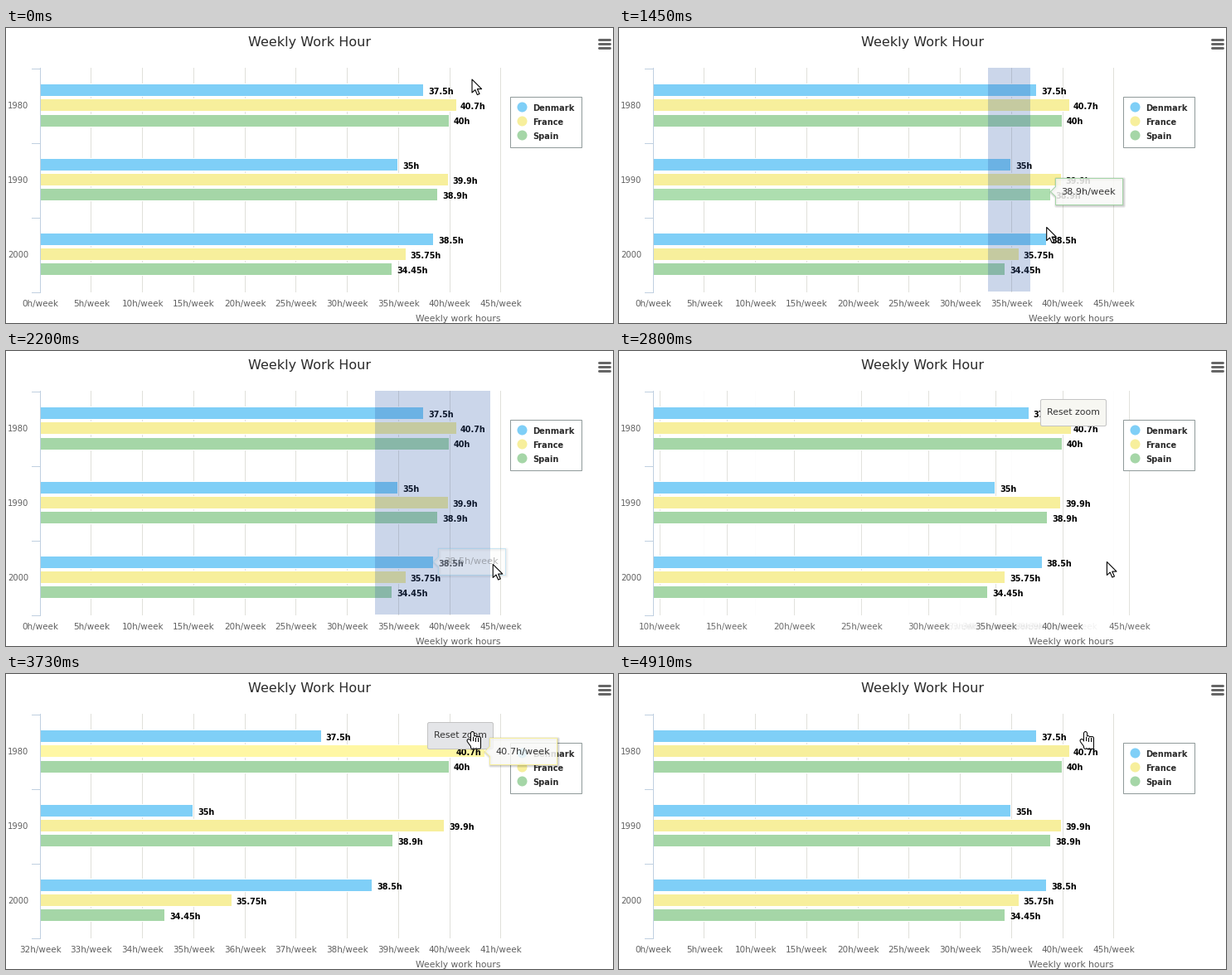
Write a matplotlib script that moves like this. It is 732 px wide and 356 px high and loops after 5.17 s.

```python
import math

import matplotlib.pyplot as plt
import numpy as np
from matplotlib.animation import FuncAnimation
from matplotlib.colors import to_rgb
from matplotlib.patches import Circle, Polygon, Rectangle, FancyBboxPatch

W, H, DPI = 732, 356, 100
PX = 72 / DPI
LOOP, STEP = 5170, 22
LEFT, TOP, BOTTOM = 41, 48, 318

YEARS = ["1980", "1990", "2000"]
SERIES = [
    ("Denmark", "#7fcff7", [37.5, 35, 38.5]),
    ("France", "#f7ef9c", [40.7, 39.9, 35.75]),
    ("Spain", "#a5d6a7", [40, 38.9, 34.45]),
]
WIDE_TICKS = range(0, 46, 5)
ZOOM_TICKS = range(32, 42)
SHARED = set(WIDE_TICKS) & set(ZOOM_TICKS)

DRAG, RELEASE, RESET = 960, 2740, 4370
ZOOM_IN, ZOOM_OUT, ZOOM_TIME = 2716, 4421, 495
HIDE_DELAY, FADE = 500, 250
SNAP = 60

# time, x, y
CURSOR = [(30, 562, 62), (360, 446, 53), (DRAG, 446, 53), (1450, 517, 244),
          (2100, 587, 258), (3100, 589, 253), (3600, 562, 69)]
ARROW = [(0, 0), (0, 16), (3.8, 12.6), (6.4, 18.6), (9, 17.5),
         (6.4, 11.6), (11.6, 11.6)]

plt.rcParams["font.family"] = "DejaVu Sans"
fig = plt.figure(figsize=(W / DPI, H / DPI), dpi=DPI, facecolor="white")
ax = fig.add_axes([0, 0, 1, 1])
ax.set_xlim(0, W)
ax.set_ylim(H, 0)
ax.axis("off")
moving = []


def text(x, y, s, size, color="#606060", ha="left", **kw):
    return ax.text(x, y, s, fontsize=size * PX, color=color, ha=ha,
                   va="baseline", **kw)


def line(xs, ys, color, width=1, **kw):
    return ax.plot(xs, ys, color=color, lw=width * PX, **kw)[0]


def rect(x, y, w, h, color, **kw):
    return ax.add_patch(Rectangle((x, y), w, h, fc=color, lw=0, **kw))


def shape(points, dx, dy, fill, edge, width=1, **kw):
    return ax.add_patch(Polygon(np.array(points) + (dx, dy), closed=True,
                                fc=fill, ec=edge, lw=width * PX,
                                joinstyle="round", **kw))


def swing(p):
    return 0.5 - math.cos(math.pi * min(max(p, 0), 1)) / 2


def lerp(a, b, k):
    return a + (b - a) * k


def wide_x(v):
    return LEFT + 12.35 * v


def zoom_x(v):
    return LEFT + 61.75 * (v - 32)


def value_x(v, k):
    return lerp(wide_x(v), zoom_x(v), k)


def zoom_at(t):
    return swing((t - ZOOM_IN) / ZOOM_TIME) - swing((t - ZOOM_OUT) / ZOOM_TIME)


def cursor_at(t):
    times, xs, ys = zip(*CURSOR)
    return np.interp(t, times, xs), np.interp(t, times, ys)


def bar_top(series, year):
    return round(68.1 + 89.85 * year + 18.25 * series)


def all_bars():
    for s, (_, color, values) in enumerate(SERIES):
        for year, v in enumerate(values):
            yield s, year, v, color


def anchor(series, year, k):
    return np.array([value_x(SERIES[series][2][year], k),
                     bar_top(series, year) + 7.5])


def find_hovers():
    """List (time, series, year) for each bar the cursor comes close to."""
    hovers = []
    for t in range(0, CURSOR[-1][0], 10):
        x, y = cursor_at(t)
        for s, year, v, _ in all_bars():
            inside = -2 <= y - bar_top(s, year) <= 16
            near = x < value_x(v, zoom_at(t)) + SNAP
            if inside and near and (not hovers or hovers[-1][1:] != (s, year)):
                hovers.append((t, s, year))
    return hovers


HOVERS = find_hovers()


def hover_at(t, k):
    """Return (series, year, position, alpha) of the tooltip, or None."""
    last = pos = None
    for start, s, year in HOVERS:
        if start > t:
            break
        target = anchor(s, year, k)
        if last is None or start - last[0] > HIDE_DELAY + FADE:
            pos = target
        else:
            pos = lerp(last[1], pos, math.exp((last[0] - start) / 50))
        last = start, target, s, year
    if last is None:
        return None
    start, target, s, year = last
    alpha = min(1, 1 - (t - start - HIDE_DELAY) / FADE)
    if alpha <= 0:
        return None
    return s, year, lerp(target, pos, math.exp((start - t) / 50)), alpha


def draw_static():
    text(366.5, 22, "Weekly Work Hour", 16, "#2b2b2b", "center")
    text(596, 354, "Weekly work hours", 10.7, "#606060", "right")
    for i in range(3):
        line([714.5, 727.5], [13.5 + 5 * i] * 2, "#666666", 3,
             solid_capstyle="round")
    line([LEFT - 0.5] * 2, [TOP, BOTTOM], "#c0d0e0", zorder=4)
    for i in range(4):
        line([LEFT - 10, LEFT], [TOP + 0.5 + 90 * i] * 2, "#c0d0e0")
    for i, year in enumerate(YEARS):
        text(27, 97 + 90 * i, year, 10, ha="right")
    ax.add_patch(Rectangle((607.5, 82.5), 86, 61, fc="white", ec="#909a9a",
                           lw=PX, zorder=5))
    for i, (name, color, _) in enumerate(SERIES):
        ax.add_patch(Circle((622.5, 95.5 + 17 * i), 6, fc=color, lw=0,
                            zorder=5))
        text(635.5, 100 + 17 * i, name, 9.9, "#2b2b2b", weight="bold", zorder=5)


def draw_ticks(t, k):
    zooming_in = t < RESET
    groups = [(WIDE_TICKS, 1 - k, wide_x, not zooming_in),
              (ZOOM_TICKS, k, zoom_x, zooming_in)]
    for ticks, opacity, final_x, incoming in groups:
        for v in ticks:
            if v in SHARED and ticks is ZOOM_TICKS:
                continue
            alpha = 1 if v in SHARED else opacity
            if alpha < 0.01:
                continue
            x = value_x(v, k)
            grid = final_x(v) if incoming and v not in SHARED else x
            yield line([grid - 0.5] * 2, [TOP, BOTTOM], "#e0e0da",
                       alpha=alpha, zorder=1)
            if -40 < x < W + 40:
                yield text(x + 0.2, 336, f"{v}h/week", 10.4, ha="center",
                           alpha=alpha)


def draw_bars(k, active):
    for s, year, v, color in all_bars():
        end, top = value_x(v, k), bar_top(s, year)
        fill = color
        if (s, year) == active:
            fill = [min(1, c + 0.03) for c in to_rgb(color)]
        yield rect(LEFT, top - 1, end - LEFT, 16, "white", zorder=2)
        yield rect(LEFT, top, end - LEFT - 1, 14, fill, zorder=2)
        # Labels stay inside the plot's right edge
        yield text(min(end + 5, lerp(548, 543, k)), bar_top(0, year) + 12 + 18 * s,
                   f"{v:g}h", 9.6, "black", weight="bold", zorder=6)


def draw_tooltip(series, year, pos, alpha):
    _, color, values = SERIES[series]
    outline = [(6, -16), (87, -16), (87, 16), (6, 16), (6, 6), (0, 0), (6, -6)]
    x, y = np.round(pos) - 0.5
    for width in (5, 3, 1):
        yield shape(outline, x + 1, y + 1, "none", "black", width,
                    alpha=0.07 * alpha, zorder=8)
    yield shape(outline, x, y, "#f9f9f7", "none", 0, alpha=0.85 * alpha,
                zorder=9)
    yield shape(outline, x, y, "none", color, alpha=alpha, zorder=9)
    yield text(x + 13, y + 3, f"{values[year]:g}h/week", 11.2, "#333333",
               alpha=alpha, zorder=9)


def draw_button(active):
    yield ax.add_patch(FancyBboxPatch(
        (508.5, 58.5), 79, 32, boxstyle="round,pad=0,rounding_size=2",
        fc="#e4e5e8" if active else "#f7f7f2", ec="#c4c4c4", lw=PX,
        zorder=7.5))
    yield text(515.5, 77, "Reset zoom", 10.9, "#333333", zorder=7.5)


def draw_hand(x, y):
    """Four fingers running down into the palm, plus a thumb."""
    fingers = [(x + 2.8 * i, y + 1.5 + (4.5 + 0.8 * i) * (i > 0))
               for i in range(4)]
    strokes = [([fx, fx], [top, y + 19]) for fx, top in fingers]
    strokes.append(([x - 4, x], [y + 11.5, y + 17]))
    for color, width in (("black", 5), ("white", 3)):
        for xs, ys in strokes:
            yield line(xs, ys, color, width, solid_capstyle="round", zorder=12)
    for fx, top in fingers[1:]:
        yield line([fx - 1.4] * 2, [top, top + 4], "black", zorder=12)


def scene(t):
    k = zoom_at(t)
    hover = hover_at(t, k)
    x, y = cursor_at(t)
    pointing = t > RELEASE and y < 90

    yield from draw_ticks(t, k)
    yield from draw_bars(k, hover[:2] if hover and hover[3] == 1 else None)
    if DRAG <= t < RELEASE:
        width = cursor_at(t - 130)[0] - 446
        yield rect(445, TOP, width, BOTTOM - TOP, "#335cad", alpha=0.25,
                   zorder=7)
    if RELEASE <= t < RESET:
        yield from draw_button(pointing)
    if hover:
        yield from draw_tooltip(*hover)
    if pointing:
        yield from draw_hand(x, y)
    else:
        yield shape(ARROW, x, y, "white", "black", 1.1, zorder=12)


def update(frame):
    while moving:
        moving.pop().remove()
    moving.extend(scene((frame + 0.5) * STEP))
    return moving


draw_static()
animation = FuncAnimation(fig, update, frames=LOOP // STEP, interval=STEP,
                          repeat=True, repeat_delay=0, blit=False)
plt.show()
```
